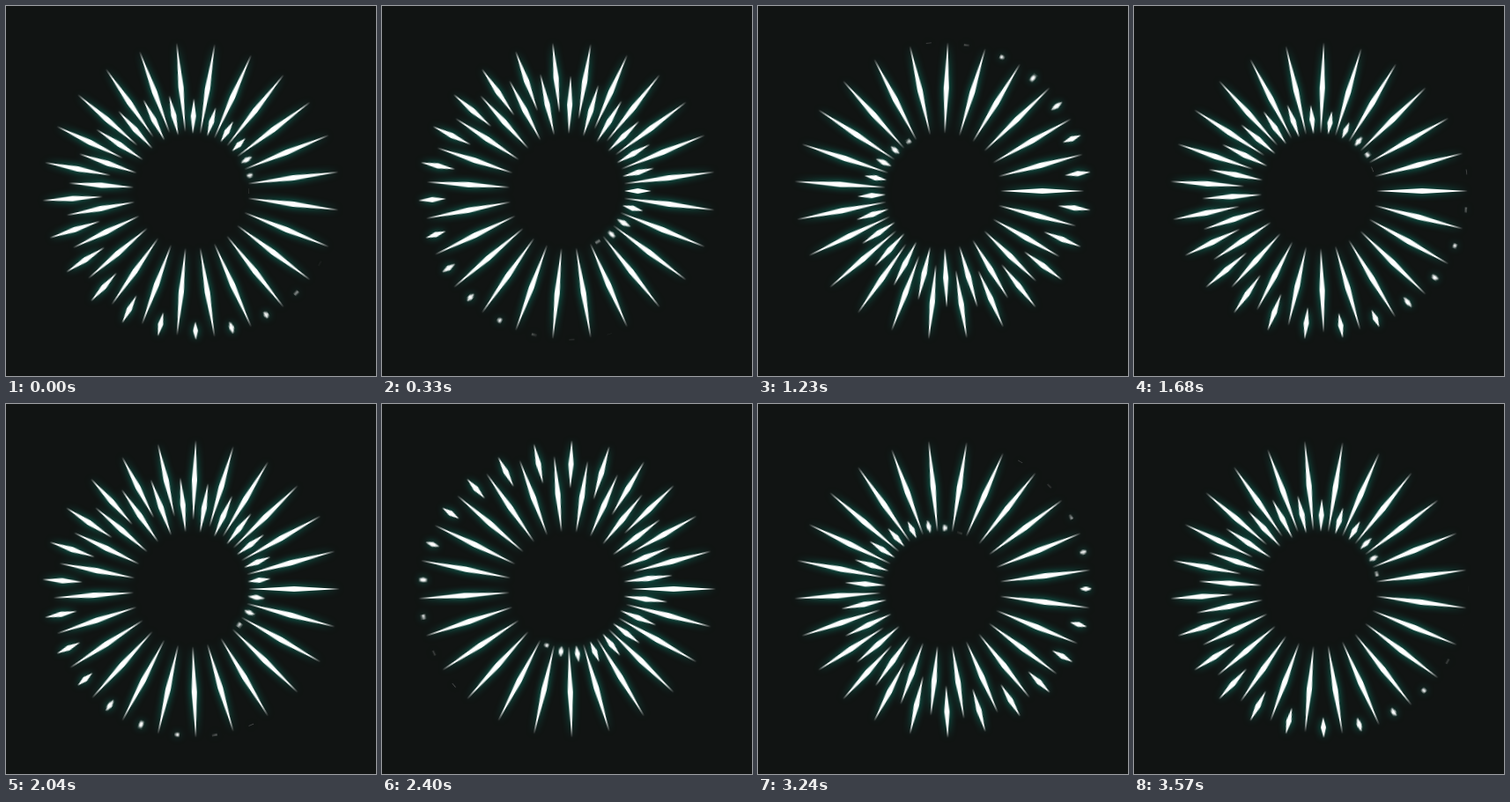
Write an HTML page without scripts that moves like this. It is 420 px wide and 420 px high and loops after 3600 ms.

```html
<!DOCTYPE html>
<html lang="en">
<head>
<meta charset="utf-8">
<title>Radial spikes</title>
<style>
  html, body {
    margin: 0;
    width: 100%;
    height: 100%;
    overflow: hidden;
    background: #111413;
  }

  .burst {
    --count: 49;
    --loop: 3.6s;
    --inner: 65px;
    --outer: 169px;
    position: absolute;
    inset: 0;
    width: 420px;
    height: 420px;
    filter: drop-shadow(0 0 4px #0a8f78);
  }

  /* The spikes wind around the ring twice, so the two turns interleave. */
  .burst i {
    position: absolute;
    left: 210px;
    top: 207px;
    width: calc(var(--outer) - var(--inner));
    height: 6px;
    background: #fff;
    clip-path: polygon(0 50%, 50% 0, 100% 50%, 50% 100%);
    transform-origin: 0 50%;
    rotate: calc(var(--k) * 720deg / var(--count));
    animation: shoot var(--loop) infinite;
    animation-delay: calc(var(--k) * var(--loop) / var(--count) - var(--loop) - 15ms);
  }

  /* Grow from the inner end, hold, then shrink into the outer end. */
  @keyframes shoot {
    0% {
      transform: translateX(var(--inner)) scaleX(0);
      animation-timing-function: cubic-bezier(.3, .38, .7, .85);
    }
    40% {
      transform: translateX(var(--inner)) scaleX(1);
    }
    60% {
      transform: translateX(var(--inner)) scaleX(1);
      animation-timing-function: cubic-bezier(.37, 0, .63, 1);
    }
    100% {
      transform: translateX(var(--outer)) scaleX(0);
    }
  }
</style>
</head>
<body>
<div class="burst">
  <i style="--k:0"></i><i style="--k:1"></i><i style="--k:2"></i><i style="--k:3"></i><i style="--k:4"></i><i style="--k:5"></i><i style="--k:6"></i>
  <i style="--k:7"></i><i style="--k:8"></i><i style="--k:9"></i><i style="--k:10"></i><i style="--k:11"></i><i style="--k:12"></i><i style="--k:13"></i>
  <i style="--k:14"></i><i style="--k:15"></i><i style="--k:16"></i><i style="--k:17"></i><i style="--k:18"></i><i style="--k:19"></i><i style="--k:20"></i>
  <i style="--k:21"></i><i style="--k:22"></i><i style="--k:23"></i><i style="--k:24"></i><i style="--k:25"></i><i style="--k:26"></i><i style="--k:27"></i>
  <i style="--k:28"></i><i style="--k:29"></i><i style="--k:30"></i><i style="--k:31"></i><i style="--k:32"></i><i style="--k:33"></i><i style="--k:34"></i>
  <i style="--k:35"></i><i style="--k:36"></i><i style="--k:37"></i><i style="--k:38"></i><i style="--k:39"></i><i style="--k:40"></i><i style="--k:41"></i>
  <i style="--k:42"></i><i style="--k:43"></i><i style="--k:44"></i><i style="--k:45"></i><i style="--k:46"></i><i style="--k:47"></i><i style="--k:48"></i>
</div>
</body>
</html>
```
